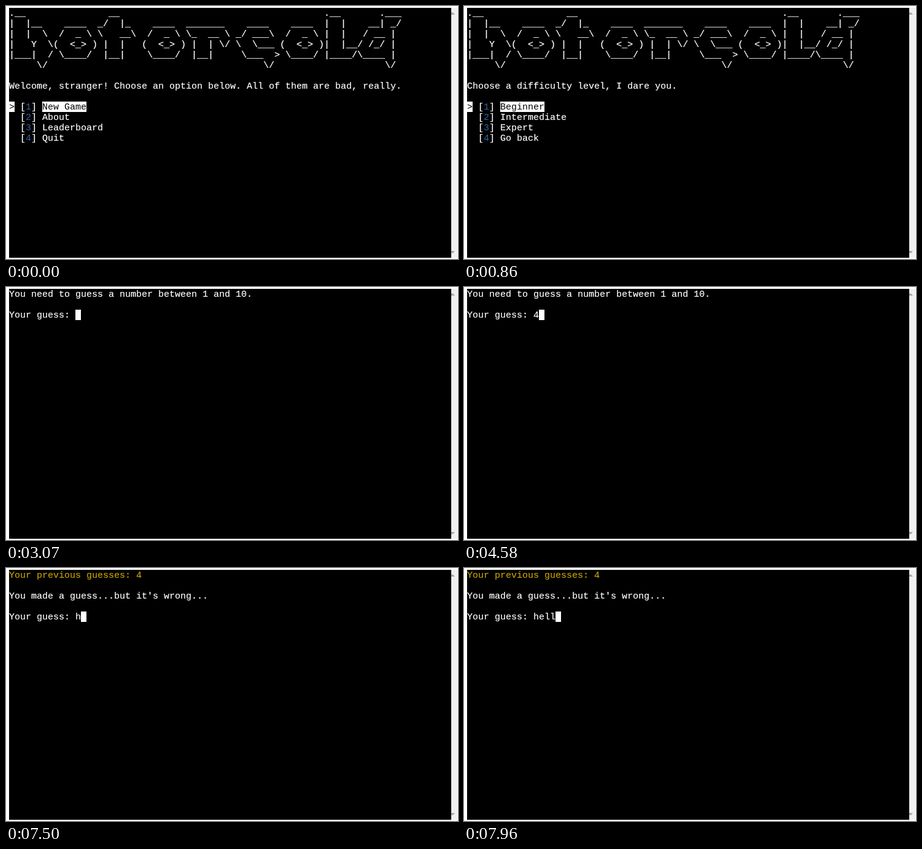
Animation of 736x413 px, one loop 8 s. Source, as an HTML page:

```html
<!DOCTYPE html>
<html lang="en">
<head>
<meta charset="utf-8">
<title>Hot or cold</title>
<style>
  html, body { margin: 0; width: 100%; height: 100%; overflow: hidden; background: #fff; }
  #term {
    position: absolute; left: 5px; top: 3px; width: 720px; height: 407px; margin: 0;
    padding-top: 1px; overflow: hidden; background: #000; color: #fff;
    font: 15px/17px "Liberation Mono", "Courier New", monospace;
    font-variant-ligatures: none;
    -webkit-text-stroke: .2px;
  }
  #bar { position: absolute; left: 725px; top: 3px; width: 10px; height: 408px; background: #f0f0ef; }
  #bar svg { display: block; }
  /* The block starts one pixel above its line, flush with the cell */
  .inv {
    display: inline-block; height: 16px; margin-top: -1px; padding-top: 1px;
    vertical-align: top; background: #fff; color: #000; -webkit-text-stroke: 0;
  }
  .num { color: #3465a4; -webkit-text-stroke: 0; }
  .old { color: #c4a000; }
</style>
</head>
<body>
<pre id="term"></pre>
<div id="bar">
  <svg width="10" height="408" fill="#a3a3a3">
    <path d="M0 10V9L2 7L6 11H0Z"/>
    <path d="M0 397H6L2 401L0 399Z"/>
  </svg>
</div>
<script>
const LOOP = 8000;

// Banner letters: cell width, then six rows
const letters = {
  h: [8, String.raw`.__
|  |__
|  |  \
|   Y  \
|___|  /
     \/`],
  o: [8, String.raw`
  ____
 /  _ \
(  <_> )
 \____/
`],
  t: [8, String.raw`  __
_/  |_
\   __\
 |  |
 |__|
`],
  r: [9, String.raw`
_______
\_  __ \
 |  | \/
 |__|
`],
  c: [8, String.raw`
  ____
_/ ___\
\  \___
 \___  >
     \/`],
  l: [6, String.raw`.__
|  |
|  |
|  |__
|____/
`],
  d: [8, String.raw`    .___
  __| _/
 / __ |
/ /_/ |
\____ |
     \/`]
};

const esc = s => s.replace(/&/g, "&amp;").replace(/</g, "&lt;").replace(/>/g, "&gt;");
const span = (cls, s) => `<span class="${cls}">${esc(s)}</span>`;
const cursor = (ch = " ") => span("inv", ch);

const banner = word => [0, 1, 2, 3, 4, 5].map(row =>
  esc([...word].map(ch => {
    const [width, art] = letters[ch];
    return art.split("\n")[row].padEnd(width);
  }).join(""))
).join("\n");

const title = banner("hotorcold");
const page = (text, body) => `${title}\n\n${esc(text)}\n\n${body}`;

const menu = items => items.map((item, i) =>
  (i ? " " : cursor(">")) + " [" + span("num", String(i + 1)) + "] " +
  (i ? esc(item) : span("inv", item))
).join("\n");

const prompt = typed => "Your guess: " + typed + cursor();
const first = typed => "You need to guess a number between 1 and 10.\n\n" + prompt(typed);
const retry = typed => span("old", "Your previous guesses: 4") +
  "\n\nYou made a guess...but it's wrong...\n\n" + prompt(typed);

const welcome = "Welcome, stranger! Choose an option below. All of them are bad, really.";
const level = "Choose a difficulty level, I dare you.";

const scenes = [
  [0, page(welcome, menu(["New Game", "About", "Leaderboard", "Quit"]))],
  [790, page(welcome, cursor())],
  [860, page(level, menu(["Beginner", "Intermediate", "Expert", "Go back"]))],
  [2990, page(level, cursor())],
  [3070, first("")],
  [4580, first("4")],
  [5040, retry("")],
  [7500, retry("h")],
  [7630, retry("he")],
  [7760, retry("hel")],
  [7960, retry("hell")]
];

const term = document.getElementById("term");
const start = performance.now();
let shown = null;

function draw() {
  const t = Math.max(0, performance.now() - start) % LOOP;
  const scene = scenes.filter(([at]) => at <= t).pop();
  if (scene !== shown) {
    term.innerHTML = scene[1];
    shown = scene;
  }
  requestAnimationFrame(draw);
}
draw();
</script>
</body>
</html>
```
